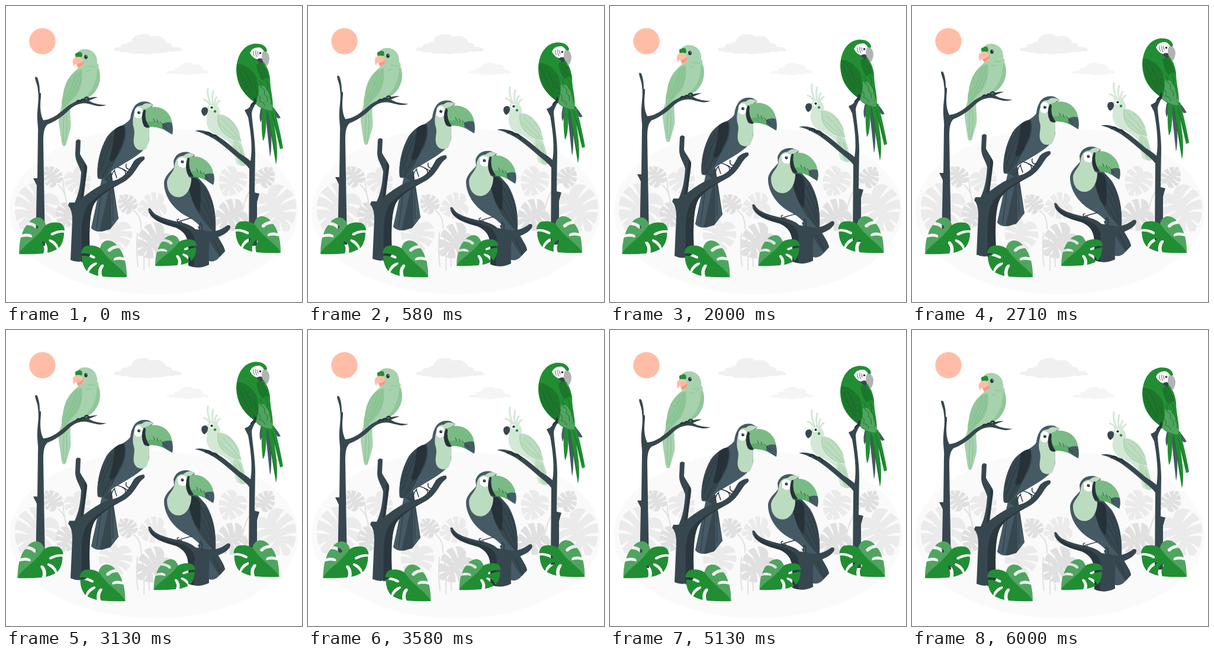
Animation of 500x500 px, one loop 6.04 s. Source, as an HTML page:

```html
<!DOCTYPE html>
<html lang="en">
<head>
<meta charset="utf-8">
<title>Birds</title>
<style>
html, body { margin: 0; height: 100%; overflow: hidden; background: #fff; }
svg { display: block; width: 100%; height: 100%; }
.g { fill: #228e34; } .gd { fill: #1c762b; } .gm { fill: #7abb85; } .gl { fill: #bcdcc0; }
.p { fill: #a7d2ae; } .pd { fill: #90c699; } .c { fill: #d3e8d6; }
.n { fill: #263238; } .t { fill: #37474f; } .b { fill: #455a64; } .w { fill: #fff; }
.e { fill: #ebebeb; } .d { fill: #e0e0e0; }
.ln { fill: none; stroke-width: .8; stroke-linecap: round; }
.claw { fill: none; stroke: #263238; stroke-width: 2.6; stroke-linecap: round; }
.crest { fill: none; stroke: #d3e8d6; stroke-width: 3; stroke-linecap: round; }
</style>
</head>
<body>
<svg viewBox="0 0 500 500">
<defs>
  <path id="half" d="M0-32C8-48 30-46 38-30Q24-26 10-16Q28-20 41-23Q46-12 45-4Q28-8 8 0Q28-2 44 3Q42 14 36 22Q22 12 7 14Q20 18 32 28Q24 40 14 45Q12 34 5 28Q8 38 9 48Q4 52 0 54Z"/>
  <g id="m"><use href="#half"/><use href="#half" transform="scale(-1 1)"/></g>
  <g id="leaf">
    <path fill="#4fa55f" d="M22 419C22 408 23 400 25 391Q36 388 43 391Q46 389 42 386Q35 383 27 386Q29 377 35 370Q45 370 50 376Q55 377 54 372Q48 366 39 365Q45 357 55 357Q66 359 68 374L50 396Z"/>
    <path class="g" d="M22 419C28 404 50 395 66 371C74 365 87 364 94 368Q99 373 99 379Q86 378 76 384Q74 389 80 387Q90 382 98 383C98 393 95 403 89 409Q86 397 74 394Q70 396 75 399Q83 404 86 411Q78 415 70 417Q72 405 65 398Q60 396 61 401Q67 409 63 418Q42 420 22 419Z"/>
  </g>
</defs>

<ellipse cx="250" cy="346" rx="244" ry="141" fill="#fafafa"/>
<circle cx="61.5" cy="59.5" r="22.2" fill="#ffbda7"/>
<path fill="#f0f0f0" d="M182 74Q184 69 193 70Q195 62 204 64Q207 60 212 61Q213 50 228 47.5Q240 46 245 52Q258 48 266 55Q271 60 270 62Q281 62 281 69Q295 68 298 75Q296 77 287 76Q283 79 275 77Q262 81 248 80Q240 83 228 80Q214 83 205 78Q194 79 190 76Q184 77 182 74Z"/>
<path fill="#f5f5f5" d="M270 113Q276 108 284 109Q283 103 291 105Q296 97 305 96Q314 95 317 99Q327 97 331 104Q332 108 334 108Q341 108 343 113Q338 115 333 113Q326 117 318 115Q308 119 300 115Q290 117 283 114Q276 115 270 113Z"/>

<g id="shrubs">
  <path class="ln" stroke="#e0e0e0" style="stroke-width:2" d="M88 302Q105 315 102 350M96 292Q98 320 106 345M222 384Q219 412 223 440M230 384Q234 415 233 446M243 382Q240 412 242 440M215 345Q229 355 228 376M424 298Q405 315 400 345M185 330Q182 350 184 372"/>
</g>

<g id="float">
  <!-- small parrot -->
  <path class="p" d="M117 86C120 73 133 70 143 75C152 79 155 90 154 97Q158 100 156 103C160 112 160 122 157 131C152 146 140 156 124 161L110 166C106 180 111 195 109 207Q105 222 101 235Q96 240 94 231L89 196C88 182 95 168 96 160C100 135 108 115 122 105Q117 97 117 86Z"/>
  <path class="pd" d="M154 104Q160 114 158 128C154 146 142 156 124 161C142 150 153 135 154 104ZM128 107C130 125 127 145 113 157L96 177Q92 165 96 152C98 135 107 109 128 107Z"/>
  <path class="ln" stroke="#7abb85" d="M126 110Q118 140 98 170M119 113Q112 142 96 162M127 122Q122 145 104 162M139 102Q143 104 145 101Q148 106 151 102M135 109Q139 112 142 108M102 183Q105 210 99 234M98 185Q96 210 97 230"/>
  <path class="g" d="M117 84Q116 79 121 79Q124 76 128 79L129 84Q127 89 123 86Q119 89 117 84Z"/>
  <path fill="#ffbda7" d="M113 91Q118 83 128 87L131 97Q128 103 122 104Q120 98 117 98Q114 103 116 104Q112 99 113 91Z"/>
  <path fill="#f29a82" d="M120 98Q125 98 130 93Q133 99 122 104Z"/>
  <ellipse class="n" cx="135" cy="86" rx="2.8" ry="3.6"/><circle class="w" cx="136" cy="84.6" r=".8"/>
  <path class="t" d="M50 405L52 303L46 291L53 291L54 215C55 205 52 195 53 180C54 165 56 155 54 143C54 135 50 128 49 121Q50 118 53 121C57 132 57 140 57 147L59 147L59 153C57 170 58 183 63 193C80 191 90 181 101 172C111 163 122 159 132 158Q146 153 155 154Q146 157 140 160C150 166 160 167 170 167Q160 171 150 168C142 166 134 163 126 165C116 167 110 172 102 180C90 191 78 197 70 200C64 206 63 215 63 230L64 290L66 405Z"/>
  <path class="claw" d="M119 162Q122 158 126 161M126 160Q129 156 133 159M133 156Q137 152 140 157"/>

  <!-- macaw and cockatoo -->
  <path class="b" d="M432 168Q426 185 430 197L436 180ZM437 172L446 255Q450 242 447 178ZM448 168Q457 177 464 189L459 190Q450 180 446 170Z"/>
  <path class="g" d="M433 170Q430 205 434 228Q440 222 440 175ZM440 170L456 268Q460 250 456 220L449 170ZM446 170L463 242L468 240Q464 215 453 172Z"/>
  <path class="g" d="M389 110C389 85 400 66 420 63.5Q438 63 441 75L434 92C440 101 444 108 446 122C446 142 453 160 450 176C440 178 434 174 427 170L414 158C398 145 390 130 389 110Z"/>
  <path class="gd" d="M390 98C400 96 415 106 423 120Q428 138 424 158Q420 162 414 158C398 145 389 125 390 98ZM431 94Q442 106 444 122Q438 120 433 126Q424 112 423 99Z"/>
  <path fill="#4fa55f" d="M427 135Q436 133 440 140Q449 152 450 176Q438 178 422 165Q428 150 427 135Z"/>
  <path class="ln" stroke="#176325" d="M417 130Q424 133 420 139Q429 143 424 149Q432 153 428 161Q436 162 437 169M428 126Q434 131 430 137Q440 142 436 149Q444 154 441 162M438 124Q446 135 440 140Q448 148 445 153Q450 160 447 166M394 108Q403 130 414 148M400 105Q412 122 416 142M442 180L456 258M449 180L464 234"/>
  <path class="w" d="M412 79Q416 69 429 70Q437 74 437 82L432 91Q418 92 412 79Z"/>
  <path class="ln" stroke="#263238" d="M418 77Q417 82 420 85M422 76Q421 82 424 86M425 77Q425 80 426 83"/>
  <circle class="n" cx="429.5" cy="79.5" r="1.8"/>
  <path class="t" d="M423 91Q428 86 435 90Q435 97 429 96Z"/>
  <path fill="#b3b3b3" d="M434 77Q443 75 445 87Q445 98 439 103Q438 96 434 94Q430 86 434 77Z"/>
  <path class="crest" d="M345 169Q341 159 334 158M347 168Q339 152 341 139M350 167Q347 154 350 144M353 168Q352 158 356 154M355 170Q356 162 361 160"/>
  <path class="c" d="M338 180C336 171 343 165 351 166C359 168 363 176 361 183C374 184 387 195 393 210C396 220 397 230 400 240L407 268Q400 273 389 266L383 240C378 227 365 222 352 216C339 209 337 195 340 186Z"/>
  <path class="gl" d="M358 184C372 180 390 197 397 227Q385 228 372 218C358 209 356 195 358 184ZM384 227Q396 228 400 240L407 268Q402 272 396 269L383 240Z"/>
  <path class="ln" stroke="#90c699" d="M358 184C356 202 365 212 372 218Q385 228 397 227M365 191Q377 202 394 224M362 199Q375 214 390 224M374 189Q386 199 394 215M387 237L397 264M394 237L403 267"/>
  <path class="t" d="M338 171Q330 170 330 178Q331 184 335 186Q342 182 341 174Z"/>
  <circle class="w" cx="347" cy="171.5" r="3.8"/><circle class="n" cx="347.5" cy="171.5" r="2.1"/><circle class="g" cx="353" cy="178" r="2.2"/>
  <path class="t" d="M410 405L411 275C405 266 390 256 378 245C366 235 356 226 341 219Q330 213 319 211Q330 208 345 214C365 221 380 237 395 249Q408 257 413 262C417 240 413 210 409 188L403 176L409 173Q416 167 420 157L424 160C419 170 416 175 415 181C416 200 421 225 421 250L420 315L428 317L424 331L424 405Z"/>
  <path class="claw" d="M337 216Q340 212 345 215L347 219M349 220Q353 216 357 221L359 225M414 168Q418 161 421 165M420 162L421 157"/>

  <!-- left toucan -->
  <path class="t" d="M164 286L144 375Q150 381 162 381L176 377L190 359L178 280Z"/>
  <path class="b" d="M176 300L158 381Q149 381 144 375L162 290ZM178 300L190 359L178 372Z"/>
  <path class="b" d="M215 173C220 162 232 160 240 162L249 167L240 177L242 222C242 238 228 249 208 261L181 277L166 291Q160 294 155 291C152 270 160 240 172 222C185 205 205 200 210 190Q211 180 215 173Z"/>
  <path class="t" d="M200 201C206 215 200 235 192 248L165 292L155 291C153 270 157 245 170 222C180 208 192 202 200 201Z"/>
  <path class="n" d="M184 208Q194 200 200 203C203 220 196 237 191 244Q188 257 178 263L174 259Q181 240 184 208Z"/>
  <path class="ln" stroke="#263238" d="M186 212Q170 245 159 278M178 220Q164 245 158 266M181 254L163 288M188 246Q184 265 169 287M161 315L153 376M180 310L181 362"/>
  <path class="gl" d="M217 178Q218 168 230 168Q236 161 249 167L234 177Q231 188 234 199L241 203C243 220 242 233 236 242Q222 247 217 236C213 226 219 216 216 207Q212 195 217 178Z"/>
  <path class="w" d="M217 177Q221 168 229 173Q232 180 229 188Q222 193 217 186Z"/>
  <circle class="n" cx="224.5" cy="180" r="2.5"/><circle class="w" cx="225.2" cy="179" r=".7"/>
  <path class="gm" d="M232 176C247 165 270 170 278 188Q283 200 281 217C272 213 264 204 243 204Q230 200 232 176Z"/>
  <path fill="#5fad6d" d="M236 197Q254 190 269 203L281 217C272 213 264 204 243 204Z"/>
  <path class="b" d="M264 199Q271 195 280 197Q283 206 281 217Q272 212 264 206Z"/>
  <path class="n" d="M233 174Q226 189 233 203Q237 207 243 205Q233 192 236 177Z"/>
  <path class="ln" stroke="#263238" d="M249 190L251 195M255 192L257 197M260 195Q264 199 272 207"/>
  <path class="t" d="M109 429L112 362Q112 344 105 337L107 332L116 332C123 318 126 300 127 281C123 268 117 262 117 250L118 228Q121 223 126 227L125 250C131 262 138 268 137 275L131 322C149 309 158 302 178 296C202 291 208 276 216 262Q224 254 233 254Q236 258 232 261C222 268 219 284 201 296C178 308 158 320 149 334C141 350 140 380 142 421Q130 438 109 429Z"/>
  <path class="n" d="M127 433C130 390 123 357 139 336Q158 314 201 296C178 308 158 320 149 334C141 350 140 380 142 421Q136 433 127 433ZM133 266Q138 270 137 275L131 322L126 326Z" opacity=".75"/>
  <path class="ln" stroke="#263238" style="stroke-width:1.4" d="M184 277Q178 282 178 291M183 278L187 290M188 272Q199 275 206 281M203 267Q201 276 210 276M197 276Q202 277 202 284"/>

  <!-- right toucan -->
  <path class="b" d="M324 372L352 376C358 393 368 403 370 414L358 427Q350 434 340 430Z"/>
  <path class="t" d="M337 384L352 380C358 393 368 403 370 414L361 424Q350 410 337 384Z"/>
  <path class="b" d="M283 262C286 250 297 245 308 247L319 251L312 265C314 280 325 290 338 305C350 325 355 350 354 378L335 383C329 371 318 362 307 356C285 346 266 322 267 297C269 285 280 278 284 272Z"/>
  <path class="t" d="M311 291Q322 286 333 300C350 322 356 350 354 384C345 378 320 350 314 325C308 310 307 298 311 291Z"/>
  <path class="n" d="M311 291Q324 288 328 302Q330 330 327 348Q318 340 313 323C308 308 307 298 311 291Z"/>
  <path class="ln" stroke="#263238" d="M329 308Q343 330 350 365M328 325Q340 343 351 374M327 340Q336 358 350 379M336 310Q348 330 352 352M349 392L362 420"/>
  <path class="gl" d="M285 267Q288 253 300 253Q308 245 319 251L307 260L308 288L313 291C313 308 305 322 292 323C279 323 272 312 272 298C273 286 285 281 285 267Z"/>
  <path class="w" d="M290 259Q296 253 303 257Q306 264 304 272Q296 275 291 269Z"/>
  <circle class="n" cx="298" cy="263" r="2.5"/><circle class="w" cx="298.7" cy="262" r=".7"/>
  <path class="gm" d="M307 257C321 249 342 258 349 277Q353 290 350 302C340 296 332 289 315 288Q303 280 307 257Z"/>
  <path fill="#5fad6d" d="M309 281Q326 275 340 288L350 302C340 296 332 289 315 288Z"/>
  <path class="b" d="M336 285Q343 281 351 284Q353 295 350 302Q341 297 336 292Z"/>
  <path class="n" d="M307 256Q301 272 307 285Q312 290 317 288Q307 275 310 257Z"/>
  <path class="ln" stroke="#263238" d="M322 275L324 280M328 278L330 283M333 281L341 291"/>
  <path class="t" d="M240 343Q243 339 246 345C252 355 270 360 288 364C305 367 315 372 320 377L345 381C360 381 368 374 375 370Q381 370 378 377C370 388 355 391 344 396Q342 410 343 437Q325 446 308 438L308 410C308 395 305 382 286 374C265 368 246 363 240 343Z"/>
  <path class="n" opacity=".75" d="M240 346Q258 362 285 368Q318 375 319 397Q316 420 318 441Q311 440 308 438L308 410C308 395 305 382 286 374C265 368 246 363 240 346Z"/>
  <path class="ln" stroke="#263238" style="stroke-width:1.4" d="M313 358Q302 361 292 364M292 360Q286 361 292 366L297 365M329 366L326 375M331 369L331 379"/>
</g>

<g id="sway">
  <use href="#leaf"/>
  <use href="#leaf" transform="translate(486 -2) scale(-1 1)"/>
  <use href="#leaf" transform="translate(226 39) scale(-1 1)"/>
  <use href="#leaf" transform="translate(232 87) scale(.91 .84)"/>
</g>
</svg>
<script>
const $ = id => document.getElementById(id);

// x, y, rotation, scale, shade
const shrubs = [
  [50, 340, 35, .83, 'e'], [122, 296, -30, .5, 'e'], [78, 288, 145, .38, 'd'], [103, 353, 20, .45, 'd'],
  [184, 388, 15, .63, 'e'], [248, 338, 75, .5, 'e'], [205, 334, 140, .36, 'd'], [250, 398, 50, .66, 'd'],
  [382, 296, 30, .53, 'e'], [380, 354, 65, .6, 'd'], [438, 289, -145, .38, 'd'], [455, 342, -30, .83, 'e']
];
for (const [x, y, r, s, shade] of shrubs)
  $('shrubs').insertAdjacentHTML('beforeend',
    `<use href="#m" class="${shade}" transform="translate(${x} ${y}) rotate(${r}) scale(${s})"/>`);

const LOOP = 6040, RISE = 10;
const shake = [0, -1, 2, -4, 4, -4, 4, -4, 2, -1, 0];

function draw(now) {
  const p = now % LOOP / LOOP;
  const lift = RISE * (1 - Math.abs(1 - 2 * p));
  const k = Math.floor(p * 10);
  const dx = shake[k] + (shake[k + 1] - shake[k]) * (p * 10 - k);
  $('float').setAttribute('transform', `translate(0 ${-lift})`);
  $('sway').setAttribute('transform', `translate(${dx} 0)`);
}

const start = performance.now();
function tick() {
  draw(performance.now() - start);
  requestAnimationFrame(tick);
}
tick();
</script>
</body>
</html>
```
